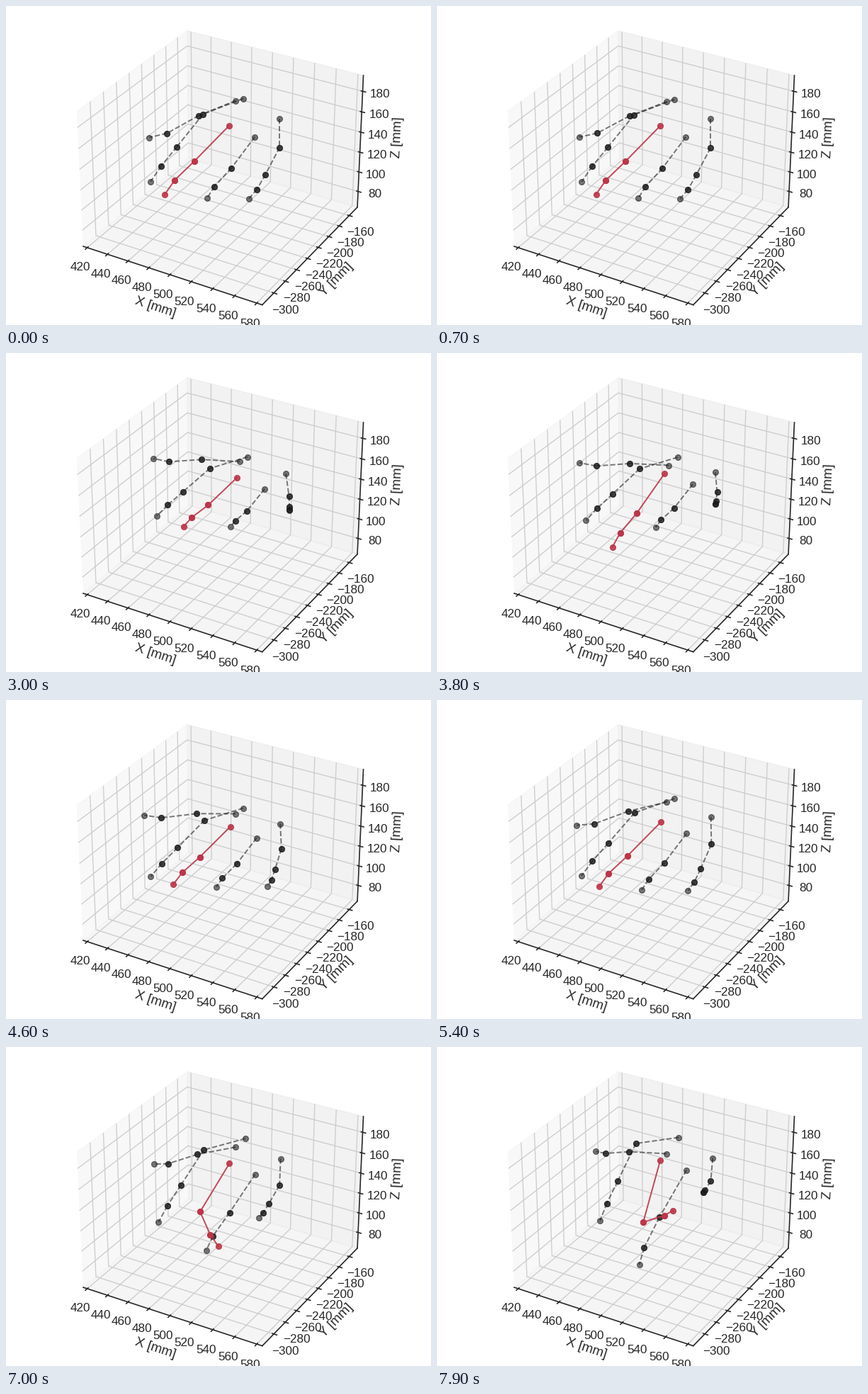
Animation of 600x450 px, one loop 8 s. Source, as a matplotlib script:

```python
import numpy as np
import matplotlib.pyplot as plt
from matplotlib.animation import FuncAnimation

W, H = 600, 450
STEP, FRAMES = 100, 80
INK = ".15"

plt.rcParams.update({
    "font.family": "Liberation Sans",
    "text.color": INK, "axes.labelcolor": INK, "axes.edgecolor": INK,
    "xtick.color": INK, "ytick.color": INK,
    "axes.labelsize": 14.4, "xtick.labelsize": 13.2, "ytick.labelsize": 13.2,
    "axes.linewidth": 1.25, "grid.color": ".8", "grid.linewidth": 1,
    "xtick.major.width": 1.25, "ytick.major.width": 1.25,
    "lines.linewidth": 1.5, "lines.markersize": 6,
})

fig = plt.figure(figsize=(6.4, 4.8), dpi=93.75, facecolor="white")

# Measured space
box = fig.add_axes([0, 0, 1, 1], projection="3d")
box.view_init(elev=30, azim=-60)
box.set_xticks(range(420, 581, 20))
box.set_yticks(range(-300, -159, 20))
box.set_zticks(range(80, 181, 20))
box.set(xlim=(416.0, 584.9), ylim=(-319.8, -143.6), zlim=(63.7, 195.2),
        xlabel="X [mm]", ylabel="Y [mm]", zlabel="Z [mm]")

# Projected hand, in stage pixels
hand = fig.add_axes([0, 0, 1, 1])
hand.set(xlim=(0, W), ylim=(H, 0))
hand.axis("off")


def ease(t, start, end):
    k = np.clip((t - start) / (end - start), 0, 1)
    return (1 - np.cos(np.pi * k)) / 2


def tap(t, mid, half=500):
    return ease(t, mid - half, mid) - ease(t, mid, mid + half)


def signals(t):
    """Strength of each hand movement at time t."""
    return {
        "grip": (ease(t, 700, 1700) - .65 * ease(t, 3000, 4600)
                 - .35 * ease(t, 4600, 6000)),
        "sag": ease(t, 0, 4600) - ease(t, 4600, 6000),
        "tap": sum(tap(t, mid) for mid in (1200, 2350, 3850, 6200)),
        "curl": ease(t, 6200, 7900),
    }


def pull(dx=0, dy=0, turn=0, fold=0, size=0, taper=0):
    """Knuckle shift, rotation (extra past the first bone), bone growth."""
    return np.array([dx, dy, turn, fold, size, taper], float)


class Finger:
    """Chain of joints, knuckle first, moved by weighted pulls."""

    def __init__(self, *rest, marked=False, **pulls):
        joints = np.array([complex(*p) for p in rest])
        self.knuckle, self.lengths = joints[0], np.diff(joints)
        self.pulls = pulls
        look = (dict(color="#bd3548", ls="-", alpha=.9) if marked
                else dict(color=".1", ls="--", alpha=.58))
        self.bones = [hand.plot([], [], marker="o", **look)[0]
                      for _ in self.lengths]

    def joints(self, level):
        dx, dy, turn, fold, size, taper = sum(
            level[name] * p for name, p in self.pulls.items())
        j = np.arange(len(self.lengths))
        angle = np.radians(turn + fold * np.minimum(j, 1))
        scale = np.maximum(1 + size + taper * np.sqrt(j), 0)
        steps = self.lengths * scale * np.exp(1j * angle)
        start = self.knuckle + complex(dx, dy)
        return start + np.concatenate([[0], np.cumsum(steps)])

    def move(self, level):
        pts = self.joints(level) + complex(-.7, .5)
        for bone, a, b in zip(self.bones, pts, pts[1:]):
            bone.set_data([a.real, b.real], [a.imag, b.imag])


thumb = Finger(
    (325, 133), (273, 154), (228, 179), (203, 185),
    grip=pull(dx=8, turn=12, size=-.04, taper=-.06),
    sag=pull(dx=-3, dy=27, turn=18),
    curl=pull(dy=17, turn=25, size=-.05, taper=-.3))

index = Finger(
    (336, 130), (279, 152), (242, 198), (220, 225), (205, 247),
    grip=pull(dx=8, turn=2, fold=6, size=-.06, taper=-.06),
    sag=pull(dx=-3, dy=22, turn=3, size=-.04),
    tap=pull(dx=2, dy=-4),
    curl=pull(dx=6, dy=-3, turn=13, fold=-26))

ring = Finger(
    (352, 184), (319, 228), (295, 254), (285, 270),
    grip=pull(dx=16, turn=2, fold=5, size=-.22, taper=-.11),
    sag=pull(dx=-3, dy=10, size=-.08),
    tap=pull(dx=2, dy=-9),
    curl=pull(dx=1, dy=-11, turn=-7, fold=-9, size=.4, taper=-.05))

little = Finger(
    (387, 158), (387, 199), (367, 237), (355, 258), (344, 271),
    grip=pull(dx=11, turn=-8, fold=-22, size=-.17, taper=-.42),
    sag=pull(dx=-3, dy=16, size=-.08),
    tap=pull(dx=2, dy=-5, size=-.13, taper=-.1),
    curl=pull(dx=3, dy=-2, turn=5, size=-.2, taper=-.45))

middle = Finger(
    (316, 168), (267, 218), (239, 245), (225, 265), marked=True,
    grip=pull(dx=13, turn=2, fold=5, size=-.14, taper=-.06),
    sag=pull(dx=-3, dy=10, size=-.08),
    tap=pull(dy=-8, turn=-11, size=.15),
    curl=pull(dy=-9, turn=-29, fold=-125, size=.3, taper=-.5))

fingers = [thumb, index, ring, little, middle]


def draw(n):
    level = signals(n * STEP)
    for finger in fingers:
        finger.move(level)
    return [bone for finger in fingers for bone in finger.bones]


anim = FuncAnimation(fig, draw, frames=FRAMES, interval=STEP,
                     repeat=True, repeat_delay=0, blit=False)
plt.show()
```
